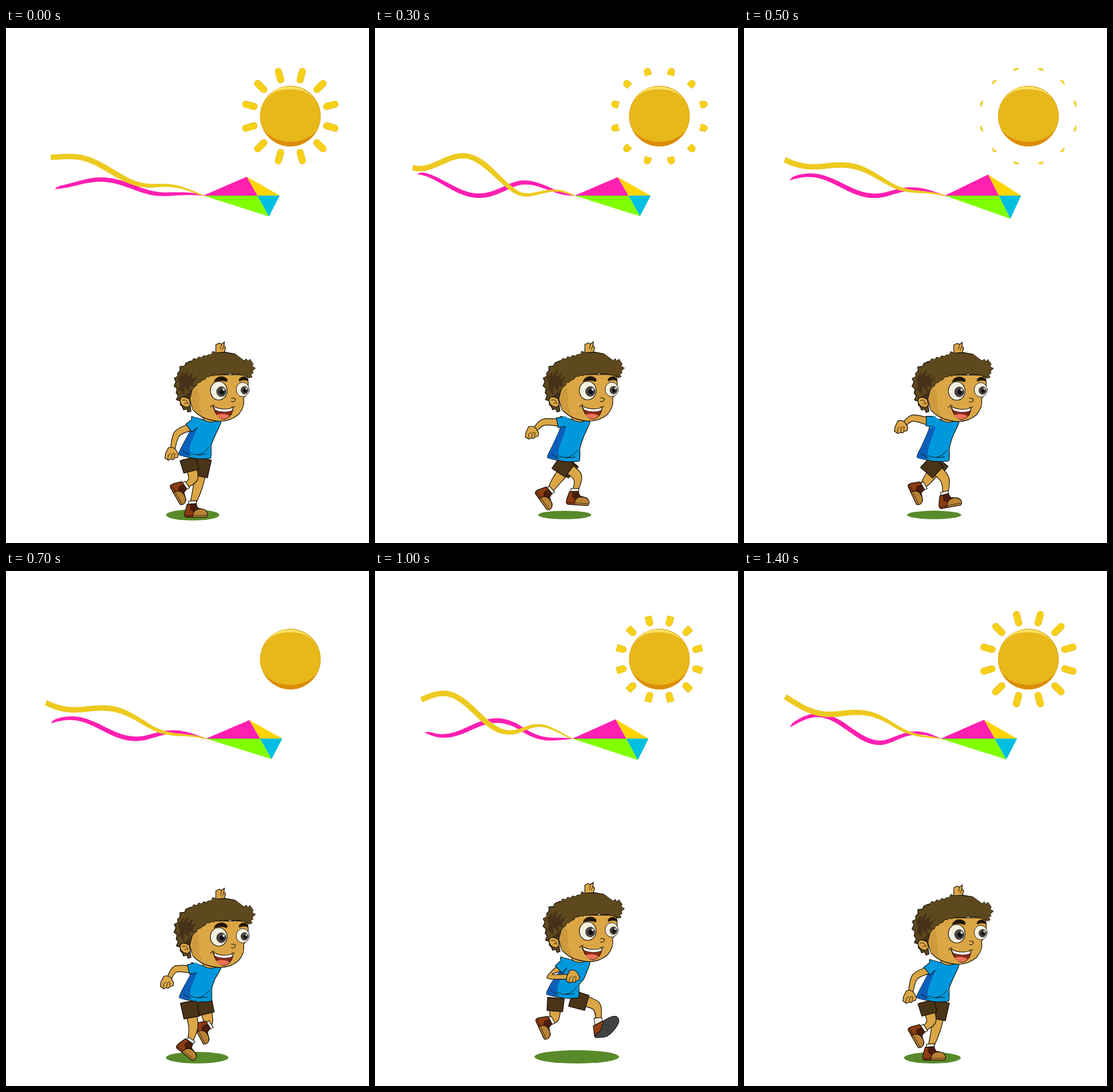
Animation, 628 px wide and 891 px high, one loop 1.5 s. Source, as an HTML page with a canvas:

```html
<!DOCTYPE html>
<html lang="en">
<head>
<meta charset="utf-8">
<title>Boy with kite</title>
<style>
  html, body { margin: 0; width: 100%; height: 100%; overflow: hidden; background: #fff; }
  canvas { display: block; width: 628px; height: 891px; }
</style>
</head>
<body>
<canvas id="stage" width="628" height="891"></canvas>
<script>
const g = document.getElementById('stage').getContext('2d');
const STEP = 100, COUNT = 15, TAU = Math.PI * 2;
const INK = '#17120a', SKIN = '#dba646', SKIN_DARK = '#cd9a3e', HAIR = '#5e481d', HAIR_DARK = '#46311a';
const BLUE = '#0098dc', BLUE_DARK = '#0c5fb9', SHORTS = '#4a3417', YELLOW = '#edca1f', PINK = '#ff20b2';

// ---------- helpers ----------
const mix = (a, b, k) => Array.isArray(a) ? a.map((v, i) => mix(v, b[i], k)) : a + (b - a) * k;
const add = ([x, y], dx, dy) => [x + dx, y + dy];
const bump = (f, mid, width) => Math.exp(-(((f - mid) / width) ** 2));

function paint(fill, line = 0, path = null) {
  if (fill) { g.fillStyle = fill; path ? g.fill(path) : g.fill(); }
  if (line) { g.strokeStyle = INK; g.lineWidth = line; path ? g.stroke(path) : g.stroke(); }
}
const shape = (d, fill, line = 0) => paint(fill, line, new Path2D(d));

function curve(p, t) {
  for (let i = 0; i < p.length - 1; i++) {
    const a = p[i - 1] || p[i], b = p[i], c = p[i + 1], d = p[i + 2] || c;
    g.bezierCurveTo(b[0] + (c[0] - a[0]) * t, b[1] + (c[1] - a[1]) * t,
      c[0] - (d[0] - b[0]) * t, c[1] - (d[1] - b[1]) * t, ...c);
  }
}

function blob(p, fill, line = 0, t = 0) {
  g.beginPath();
  g.moveTo(...p[0]);
  curve([...p, p[0]], t);
  g.closePath();
  paint(fill, line);
}

function trace(p, line) {
  g.beginPath();
  p.forEach(q => g.lineTo(...q));
  paint(null, line);
}

// Band along points, with a width at each one.
function ribbon(p, widths, fill, line = 0) {
  const side = s => p.map(([x, y], i) => {
    const a = p[i - 1] || p[i], b = p[i + 1] || p[i];
    const dx = b[0] - a[0], dy = b[1] - a[1], h = s * widths[i] / 2 / Math.hypot(dx, dy);
    return [x - dy * h, y + dx * h];
  });
  const up = side(-1), low = side(1).reverse();
  g.beginPath();
  g.moveTo(...up[0]);
  curve(up, 1 / 6);
  g.lineTo(...low[0]);
  curve(low, 1 / 6);
  g.closePath();
  paint(fill, line);
}

function oval(x, y, rx, ry, fill, line = 0) {
  g.beginPath();
  g.ellipse(x, y, rx, ry, 0, 0, TAU);
  paint(fill, line);
}

function at(x, y, deg, scale, draw) {
  g.save();
  g.translate(x, y);
  g.rotate(deg * Math.PI / 180);
  g.scale(scale, scale);
  draw();
  g.restore();
}

// ---------- sun ----------
function ray(inner, outer) {
  g.beginPath();
  g.rect(inner, -9, outer - inner, 18);
  g.clip();
  g.beginPath();
  g.roundRect(59, -6, 27, 12, 6);
  paint('#d8ac16');
  g.beginPath();
  g.roundRect(59.6, -5.6, 26, 10.8, 5.3);
  paint('#f7d118');
}

// Rays vanish outwards, then grow out of the disc again.
function sun(f) {
  const inner = f < 7 ? 59 + 4.7 * f : 58;
  const outer = f < 7 ? 87 : Math.min(87, 58 + 4.65 * (f - 6) * (f > 7));
  if (outer > inner) {
    for (let i = 0; i < 12; i++) at(492, 152.5, 15 + 30 * i, 1, () => ray(inner, outer));
  }
  oval(492, 152.5, 52.5, 52.5, '#c99a14');
  oval(492, 152.5, 51.8, 51.8, '#e8b719');
  shape('M449 128C457 110 473 106 491 106S525 110 535 126C525 109 509 101 491 101S457 109 449 128Z', '#fae163');
  shape('M446 177Q464 197 492 197T538 177A52 52 0 0 1 446 177Z', '#dc8d0b');
}

// ---------- kite ----------
// Tail waves: length, then crest place and height for each ribbon.
const WAVES = {
  A: [264, 0.43, 10, 0.25, 10],
  B: [261, 0.46, 20, 0.1, 16],
  C: [277, 0.21, 11, 0.42, 15],
  D: [280, 0.3, 22, 0.56, 17],
  E: [269, 0.1, 11, 0.37, 21]
};
const WAVE_ORDER = 'AABDCCCCDBBBDDE';

function tail(x, y, length, rise, sag, crest, height, width, color) {
  const p = [], w = [];
  for (let u = 0; u <= 1.001; u += 0.05) {
    const wave = height * Math.cos((u - crest) / 0.7 * TAU);
    p.push([x - length * u, y - rise * u + Math.min(1, 3 * u) * (wave - sag)]);
    w.push(width(u));
  }
  ribbon(p, w, color);
}

function kite(f) {
  const u = (f + 3) % COUNT;
  const x = 338 + Math.min(1.17 * u, 1.6 * (COUNT - u)), y = 290;
  const up = 34.2 + 2.3 * Math.cos((f * 4 / COUNT - 0.37) * TAU);
  const [length, c1, h1, c2, h2] = WAVES[WAVE_ORDER[f]];
  tail(x, y, length + 22, 16, 8, c2, h2, v => 1 + 7 * Math.sin(Math.PI * v) ** 0.6, PINK);
  tail(x, y, length, 70, 0, c1, h1, v => 2 + 7.5 * Math.min(1, 1.8 * v), YELLOW);
  const tip = [x, y], top = [x + 75, y - up], nose = [x + 132, y], low = [x + 113.5, y + up + 3.5], mid = [x + 93.5, y];
  blob([tip, top, mid], PINK);
  blob([top, nose, mid], '#ffd500');
  blob([tip, mid, low], '#80ff00');
  blob([mid, nose, low], '#00bfe0');
}

// ---------- boy ----------
// Key poses of the run. Legs: knee x, y, then foot x, y and tilt.
const PASS = { bob: 0, waist: [327, 741], elbow: [296, 702], fist: [286, 737],
  near: [324, 779, 309, 793, 60], far: [332, 793, 323, 824, 0] };
const CROUCH = { bob: 1.5, waist: [326, 744], elbow: [292, 696], fist: [274, 721],
  near: [341, 775, 329, 801, 42], far: [326, 783, 316, 806, 42] };
const LEAP = { bob: -2, waist: [327, 748], elbow: [291, 668], fist: [268, 680],
  near: [358, 775, 363, 804, -35], far: [304, 780, 288, 797, 66] };
const LAND = { bob: 5.5, waist: [328, 741], elbow: [293, 689], fist: [278, 712],
  near: [324, 788, 318, 815, 38], far: [350, 778, 350, 787, 62] };
const BOUND = { bob: -4.5, waist: [325, 735], elbow: [302, 701], fist: [342, 702],
  near: [310, 774, 303, 779, 65], far: [382, 752, 386, 783, -35] };
const STRIDE = { bob: -2.5, waist: [338, 736], elbow: [303, 703], fist: [311, 730],
  near: [310, 770, 302, 777, 68], far: [358, 786, 358, 817, 2] };
const RUN = [PASS, CROUCH, LEAP, LAND, BOUND, STRIDE, PASS];
const KEYS = [0, 2, 4, 7, 10, 12, 14];

function pose(f) {
  const i = Math.max(0, KEYS.findIndex(k => k >= f) - 1);
  const k = (f - KEYS[i]) / (KEYS[i + 1] - KEYS[i]), out = {};
  for (const part in PASS) out[part] = mix(RUN[i][part], RUN[i + 1][part], k);
  return out;
}

function shoe() {
  shape('M-7-5L6-6 6 4-6 4Z', '#f5f1e4', 1);
  shape('M-9 0L-13 14Q-14 21-10 21H22Q26 14 20 9L8 6 5-1Z', '#8d3c12', 1.2);
  shape('M-3 0L5-1 9 7 3 14-4 8Z', '#4a1d0d', 0.6);
  shape('M0 18Q2 9 9 8Q20 6 24 14Q25 19 22 21L0 21Z', '#b98234', 1);
  shape('M-12 18H23', null, 0.7);
}

function shoeSole() {
  shape('M-7-9L6-10 8 0-5 4Z', '#f5f1e4', 1);
  shape('M-8 4L7-4 17-3 4 15-6 21Z', '#93400f', 1.2);
  shape('M9-4Q21-13 30-12Q36-8 34-2Q29 11 15 21Q5 24-5 23L-4 17Q3 15 5 9Z', '#434346', 1.2);
  shape('M10 2l12 3M9 8l9 4M22-5l6 5', null, 0.6);
}

function leg(hip, [kx, ky, x, y, tilt]) {
  const knee = [kx, ky], hem = mix(hip, knee, 0.64);
  ribbon([hip, knee, [x, y]], [21, 16, 9], SKIN, 1.2);
  if (tilt < -12) at(x, y, tilt + 35, 1.04, shoeSole);
  else at(x, y, tilt, 1.06, shoe);
  ribbon([hip, hem], [29, 27], SHORTS, 1.3);
}

function fist(x, y) {
  at(x, y, 0, 1, () => {
    shape('M-5-11Q4-13 8-7L12 0 11 6 6 7 3 10-1 9-5 11-11 7-10-1Z', SKIN, 1.2);
    shape('M-6 9l1-7 4-3M0 8l1-7 4-2M5 6l1-6', null, 0.9);
  });
}

function shirt({ bob, waist: w, elbow, fist: hand }) {
  const armpit = [320, 694 + bob / 2], back = add(w, -20, -22), hem = add(w, -28, -3);
  blob([[321, 672 + bob], [350, 680 + bob], [372, 681 + bob], mix([363, 704], w, 0.04), add(w, 28, -19),
    add(w, 27, 3), add(w, 2, 4), hem, back, armpit], BLUE, 1.2, 0.08);
  blob([armpit, add(armpit, 11, -4), add(back, 12, 2), add(hem, 17, 3), hem, back], BLUE_DARK, 0, 0.1);
  at(...w, 0, 1, () => shape('M24-16q-8 12-19 13M20-4q-16 4-29-2M-21-9l14 8', null, 0.9));
  const joint = [322, mix(684 + bob, elbow[1], 0.3)], wrist = mix(elbow, hand, 0.78);
  ribbon([joint, elbow, wrist], [13, 11, 8], SKIN, 1.2);
  fist(...hand);
  const cuff = mix(joint, elbow, 0.22);
  ribbon([[332, 680 + bob], cuff], [17, 17], BLUE);
  const tilt = Math.atan2(cuff[1] - 680 - bob, cuff[0] - 332) / TAU * 360;
  at(...cuff, tilt, 1, () => shape('M-12-8.5H0V8.5H-12M-6 8.5', null, 1.2));
  ribbon([[336, 681 + bob], [322, mix(683 + bob, cuff[1], 0.5)]], [12, 14], BLUE);
}

// Adds uneven tufts to the left of a line.
function tufts(line, gap, size) {
  const out = [];
  for (let i = 0; i < line.length - 1; i++) {
    const [a, b] = [line[i], line[i + 1]];
    const dx = b[0] - a[0], dy = b[1] - a[1], d = Math.hypot(dx, dy), n = Math.max(1, Math.round(d / gap));
    for (let j = 0; j < n; j++) {
      const h = size * (0.75 + 0.35 * Math.sin(5 * i + 3 * j)) / d;
      out.push(mix(a, b, j / n), add(mix(a, b, (j + 0.45) / n), dy * h, -dx * h));
    }
  }
  return [...out, line[line.length - 1]];
}

const BACK = tufts([[320, 663], [305, 655], [298, 636], [294, 612], [301, 593], [317, 577]], 10, 5);
const CROWN = tufts([[322, 576], [347, 568], [364, 562]], 9, 4);
const QUIFF = tufts([[412, 576], [425, 578], [426, 593], [420, 605]], 8, 5);
const FRINGE = tufts([[420, 605], [400, 599], [375, 600], [352, 603], [336, 613], [323, 625], [317, 642]], 8, -2.5);
const MOP = [...BACK, ...CROWN, [379, 561], [396, 564], ...QUIFF, ...FRINGE];

function eye(x, y, size, look) {
  at(x, y, 0, size, () => {
    oval(0, 0, 14.5, 16, '#f4f0df', 1.2);
    oval(look, 1.5, 8, 8.6, '#4b4748', 0.8);
    oval(look + 1, 2, 4.2, 4.6, '#111');
    oval(look + 4, -2, 2, 2.2, '#d9d6cc');
  });
}

function head() {
  shape('M339 668H366L361 681Q350 684 341 677Z', SKIN, 1);
  blob(MOP, HAIR, 1.3);
  shape('M318 642L324 618 345 600H416Q424 620 411 641Q414 655 402 669Q386 682 366 680Q339 678 323 660Z', SKIN, 1.2);
  shape('M320 640L326 622Q336 624 333 634Q336 645 334 655L341 671 323 660Z', SKIN_DARK);
  blob([[317, 642], [301, 596], ...CROWN, [396, 564], ...QUIFF, ...FRINGE], HAIR);
  trace(FRINGE, 1);
  shape('M298 606L307 594 306 603 316 590 313 604 324 596 320 608 331 602 323 614 326 621 317 618 318 630 309 620 308 635 300 625 297 632 301 617Z', HAIR_DARK);
  shape('M299 641L309 636 321 627 318 642 301 646Z', HAIR_DARK);
  shape('M317 642Q303 634 301 644Q302 656 315 656L319 652Z', SKIN, 1.2);
  shape('M305 644Q313 641 315 651M309 650l4-2', null, 0.9);

  eye(409.5, 625.5, 0.78, 4);
  eye(368, 627.5, 1, 4.5);
  shape('M360 612Q362 604 372 603Q379 603 383 608L382 612Q372 608 360 612Z', '#231608', 0.6);
  shape('M403 608Q407 602 414 604Q419 606 419 611Q412 607 404 611Z', '#231608', 0.6);
  shape('M390 640Q399 640 396 645Q394 648 390 646', null, 1.1);

  shape('M358 654Q375 663 393 657Q391 673 378 677Q365 677 358 654Z', '#8d291b', 1.2);
  shape('M359 655Q375 663 393 657L391 662Q376 667 362 661Z', '#fff', 0.6);
  shape('M364 669Q376 665 387 671Q382 677 375 676.5Q368 676 364 669Z', '#ee7258');
  shape('M354 656Q356 652 360 652M390 656l6-1', null, 1.1);
}

function raisedHand() {
  shape('M363 563V547L369 544 373 546 378 542 377 549 380 552 377 563Z', SKIN, 1.2);
  shape('M373 546L371 554M377 549L374 556', null, 0.9);
}

function shadow(f) {
  const far = bump(f, 10, 2.7), air = bump(f, 4, 1.5);
  oval(323 + 26 * far + 8 * air, 842.5 - 2 * far, 46 + 27 * far, 9.5 + 2 * far - 3.5 * air, '#588a2a');
}

function boy(f) {
  const p = pose(f);
  shadow(f);
  at(0, p.bob + 1, 0, 1, raisedHand);
  leg(add(p.waist, 14, 4), p.far);
  leg(add(p.waist, -12, 4), p.near);
  shirt(p);
  at(0, p.bob, 0, 1, head);
}

// ---------- loop ----------
g.lineJoin = g.lineCap = 'round';
function frame() {
  const f = Math.floor(performance.now() / STEP) % COUNT;
  g.fillStyle = '#fff';
  g.fillRect(0, 0, 628, 891);
  sun(f);
  kite(f);
  boy(f);
  requestAnimationFrame(frame);
}
frame();
</script>
</body>
</html>
```
